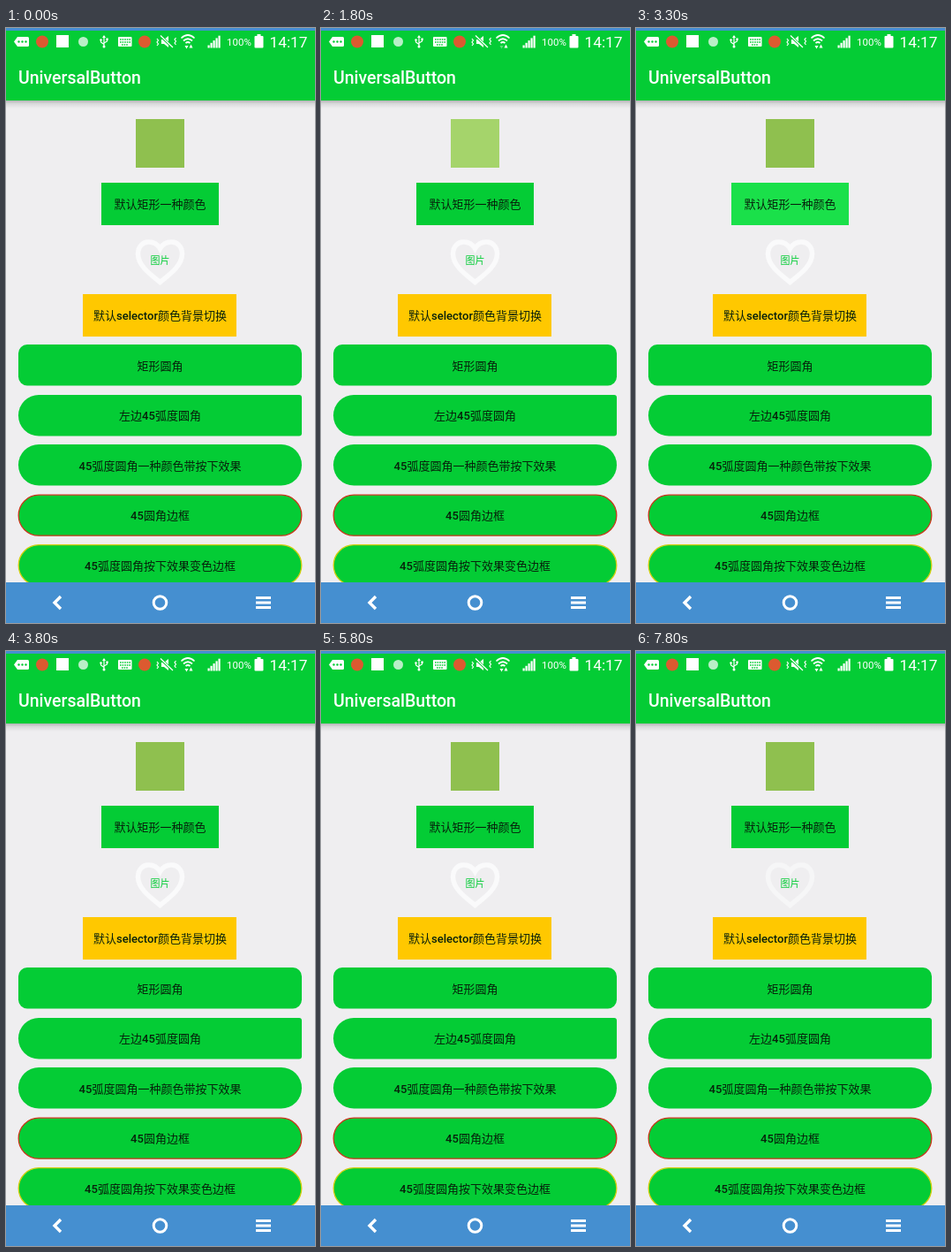
Animation, 350 px wide and 673 px high, one loop 8000 ms. Source, as an HTML page:

```html
<!DOCTYPE html>
<html lang="zh-CN">
<head>
<meta charset="utf-8">
<title>UniversalButton</title>
<style>
html, body { margin: 0; width: 100%; height: 100%; overflow: hidden; background: #efeef0; }
svg { display: block; width: 350px; height: 673px; }
text { font-family: Roboto, "Noto Sans CJK SC", "Noto Sans CJK", sans-serif; }
.label { font-size: 13px; text-anchor: middle; fill: #07200b; }
.latin { font-weight: 500; }
</style>
</head>
<body>
<svg viewBox="0 0 350 673" xmlns="http://www.w3.org/2000/svg">
  <defs>
    <linearGradient id="shade" x2="0" y2="1">
      <stop offset="0" stop-color="#b4b4b6"/>
      <stop offset=".4" stop-color="#d9d9db"/>
      <stop offset="1" stop-color="#efeef0"/>
    </linearGradient>
  </defs>
  <rect width="350" height="673" fill="#efeef0"/>
  <rect y="82" width="350" height="9" fill="url(#shade)"/>
  <rect width="350" height="82" fill="#04cc35"/>
  <rect width="350" height="3" fill="#458fd0"/>

  <g id="status" fill="#fff">
    <path d="M13 10H24.500Q26 10 26 11.500V19.500Q26 21 24.500 21H13L9 15.500Z"/>
    <g fill="#04cc35"><circle cx="14.500" cy="15.500" r="1.200"/><circle cx="18.500" cy="15.500" r="1.200"/><circle cx="22.500" cy="15.500" r="1.200"/></g>
    <circle cx="41" cy="15.500" r="7" fill="#dc5a30"/>
    <rect x="57" y="8" width="14" height="14"/>
    <circle cx="87.500" cy="15.500" r="5.500" fill="#b9efc7"/>
    <g fill="none" stroke="#fff" stroke-width="1.200">
      <path d="M111 10V21M111 18.500L107.500 16V13.500M111 17L114.500 15V12.500"/>
    </g>
    <path d="M111 8L113 11H109Z"/>
    <circle cx="111" cy="21" r="1.500"/>
    <circle cx="107.500" cy="13.500" r="1.200"/>
    <rect x="113.400" y="11.500" width="2.300" height="2.300"/>
    <rect x="127" y="10" width="15.500" height="11" rx="1"/>
    <path d="M129 13H141M129 16H141M131 19H138.500" stroke="#04cc35" stroke-width="1.300" stroke-dasharray="1.600 1"/>
    <circle cx="157" cy="15.500" r="7" fill="#dc5a30"/>
    <path d="M176 13H179L184 9V22L179 18H176Z"/>
    <path d="M175 9L189 22" stroke="#04cc35" stroke-width="3"/>
    <path d="M175 8.500L189 22M171 12L172.500 14L171 16L172.500 18L171 20M192.500 11L191 13L192.500 15L191 17L192.500 19" fill="none" stroke="#fff" stroke-width="1.200"/>
    <path d="M198.500 11.500Q206 4.500 213.500 11.500M201 14.500Q206 10 211 14.500M203.500 17Q206 15 208.500 17" fill="none" stroke="#fff" stroke-width="1.700"/>
    <path id="down" d="M202.500 20H206.500L204.500 23.500Z"/>
    <path d="M207.500 22.500H211.500L209.500 18.500Z"/>
    <rect x="284.500" y="7" width="4" height="3"/>
    <rect x="281.500" y="9" width="10" height="13.500" rx="1"/>
    <text x="250" y="20" font-size="11.500">100%</text>
    <text x="298.500" y="22" font-size="17.300">14:17</text>
  </g>
  <text x="14" y="62.500" font-size="19.500" fill="#fff" class="latin">UniversalButton</text>

  <rect id="icon" x="147" y="103" width="55" height="55"/>
  <rect id="plain" x="108" y="175" width="133" height="48"/>
  <path id="heart" d="M174.500 287.500C164 279 149.500 269 149.500 255.500C149.500 247 155 242 161.500 242C167 242 172 245 174.500 249.500C177 245 182 242 187.500 242C194 242 199.500 247 199.500 255.500C199.500 269 185 279 174.500 287.500Z" fill="none" stroke-width="5.500"/>
  <text x="174.500" y="267" text-anchor="middle" font-size="11" fill="#04cc35">图片</text>
  <rect x="87" y="301" width="174" height="48" fill="#ffc800"/>
  <g fill="#04cc35">
    <rect x="14" y="358" width="321" height="46.500" rx="10"/>
    <path d="M37.250 415H332Q335 415 335 418V458.500Q335 461.500 332 461.500H37.250A23.250 23.250 0 0 1 37.250 415Z"/>
    <rect x="14" y="471" width="321" height="46.500" rx="23.250"/>
    <rect x="14.200" y="528.200" width="320.600" height="46" rx="23" stroke="#c8381c" stroke-width="1.300"/>
    <rect x="14.200" y="584.700" width="320.600" height="46" rx="23" stroke="#d2cf10" stroke-width="1.300"/>
  </g>
  <g id="labels"></g>

  <rect y="627" width="350" height="46" fill="#458fd0"/>
  <g fill="none" stroke="#fff" stroke-width="3.400">
    <path d="M62 643L55 650L62 657"/>
    <circle cx="174.500" cy="650" r="7.300" stroke-width="3"/>
    <path d="M283 644.500H300M283 650H300M283 655.500H300" stroke-width="3"/>
  </g>
</svg>
<script>
const NS = "http://www.w3.org/2000/svg";
const LOOP = 8000;
const $ = id => document.getElementById(id);

function add(parent, tag, attrs, content) {
  const el = document.createElementNS(NS, tag);
  for (const key in attrs) el.setAttribute(key, attrs[key]);
  if (content) el.textContent = content;
  parent.appendChild(el);
  return el;
}

// Latin runs are always medium; the Chinese runs take the given weight.
function label(str, y, weight = 400) {
  const text = add($("labels"), "text", { x: 174.5, y, class: "label", "font-weight": weight });
  for (const run of str.match(/[a-z0-9]+|[^a-z0-9]+/g)) {
    add(text, "tspan", /^[a-z0-9]/.test(run) ? { class: "latin" } : {}, run);
  }
}

label("默认矩形一种颜色", 204);
label("默认selector颜色背景切换", 330);
label("矩形圆角", 386.5);
label("左边45弧度圆角", 443);
label("45弧度圆角一种颜色带按下效果", 499.5, 500);
label("45圆角边框", 556, 500);
label("45弧度圆角按下效果变色边框", 612.5, 500);

for (let i = 0; i < 5; i++) {
  const h = 3 + i * 2.7;
  add($("status"), "rect", { x: 228.5 + i * 3, y: 22.5 - h, width: 2.2, height: h });
}

const within = (t, spans) => spans.some(([from, to]) => t >= from && t < to);
const fill = (id, color) => $(id).setAttribute("fill", color);

function draw(t) {
  fill("icon", within(t, [[500, 700], [1800, 2200]]) ? "#a5d46b" : "#8fc04f");
  fill("plain", within(t, [[3300, 3800], [5500, 5800]]) ? "#1ae04a" : "#04cc35");
  $("heart").setAttribute("stroke", t < 7400 ? "#fafafb" : t < 7800 ? "#ffffff" : "#f6f6f7");
  $("down").setAttribute("opacity", within(t, [[1800, 2700]]) ? 0.35 : 1);
}

const start = performance.now();
function tick() {
  draw((performance.now() - start) % LOOP);
  requestAnimationFrame(tick);
}
draw(0);
requestAnimationFrame(tick);
</script>
</body>
</html>
```
